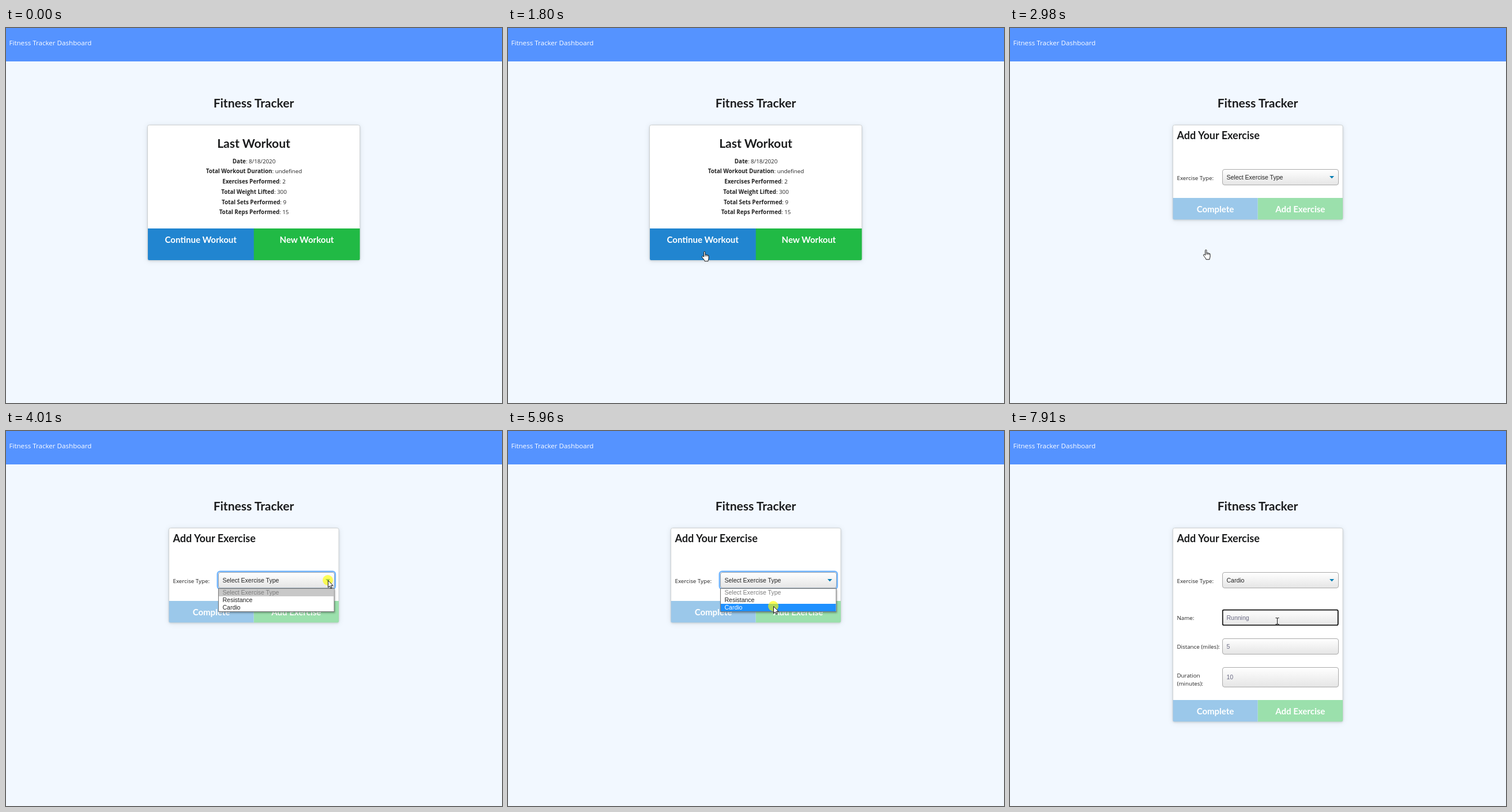
An HTML page that plays this animation: 860 by 651 pixels, repeating every 8000 ms.

```html
<!DOCTYPE html>
<html lang="en">
<head>
<meta charset="utf-8">
<title>Fitness Tracker</title>
<style>
html, body { margin: 0; width: 100%; height: 100%; overflow: hidden; background: #f2f8ff; }
svg { display: block; width: 860px; height: 651px; }
text { white-space: pre; }
.ui { font: 9.75px "Open Sans", "Noto Sans", sans-serif; fill: #222; }
.ui tspan { font-weight: 700; }
.head { font: 700 21px Lato, sans-serif; fill: #1b1c1d; }
.btn { font: 700 15px Lato, sans-serif; fill: #fff; }
.field { font: 10.5px "Liberation Sans", Arial, sans-serif; fill: #222; }
.hint { fill: #6b6b85; }
.mid { text-anchor: middle; }
.card { fill: #fff; stroke: #d0d3d4; filter: drop-shadow(0 1px 1.5px rgba(34,36,38,.13)) drop-shadow(0 1px 4px rgba(34,36,38,.1)); }
.box { fill: url(#shade); stroke: #aaa; }
</style>
</head>
<body>
<svg viewBox="0 0 860 651">
  <defs>
    <linearGradient id="shade" x2="0" y2="1">
      <stop stop-color="#fff"/><stop offset="1" stop-color="#e5e5e5"/>
    </linearGradient>
  </defs>
  <rect width="860" height="58" fill="#5593ff"/>
  <text class="ui" x="5.5" y="30" style="font-size:11.6px;fill:#fff">Fitness Tracker Dashboard</text>
  <text class="head mid" x="429.5" y="138">Fitness Tracker</text>

  <g id="summary">
    <rect class="card" x="245.5" y="168.5" width="368" height="234.5" rx="3"/>
    <text class="head mid" x="429.5" y="208">Last Workout</text>
    <g id="stats" class="ui mid"></g>
    <path id="resume" d="M246 348H430V403H248Q246 403 246 401Z"/>
    <path d="M429.7 348H613.5V401Q613.5 403 611.5 403H429.7Z" fill="#21ba45"/>
    <text class="btn mid" x="337.7" y="373">Continue Workout</text>
    <text class="btn mid" x="521.5" y="373">New Workout</text>
  </g>

  <g id="form">
    <rect id="sheet" class="card" x="282.5" y="168.5" width="294.5" rx="3"/>
    <text class="head" x="289.5" y="193" style="font-size:18px">Add Your Exercise</text>
    <text class="ui" x="289.5" y="263.5">Exercise Type:</text>
    <rect class="box" x="368.5" y="245.5" width="201" height="27" rx="3.5"/>
    <path d="M554 257H562L558 261.3Z" fill="#007cb2"/>
    <text id="choice" class="field" x="375.5" y="263"></text>
    <rect id="ring" x="366.7" y="243.7" width="204.2" height="30.4" rx="4.5" fill="none" stroke="#3b99fc" stroke-opacity=".7" stroke-width="2.5"/>
    <g id="cardio">
      <text class="ui" x="289.5" y="328">Name:</text>
      <text class="ui" x="289.5" y="378">Distance (miles):</text>
      <text class="ui" x="289.5" y="428">Duration</text>
      <text class="ui" x="289.5" y="442">(minutes):</text>
      <rect class="box" x="368.5" y="310.5" width="201" height="27" rx="3.5"/>
      <rect class="box" x="368.5" y="360.5" width="201" height="27" rx="3.5"/>
      <rect class="box" x="368.5" y="410.5" width="201" height="34" rx="3.5"/>
      <text class="field hint" x="375.5" y="327.5">Running</text>
      <text class="field hint" x="375.5" y="377.5">5</text>
      <text class="field hint" x="375.5" y="431">10</text>
      <rect id="focus" x="368.7" y="310.7" width="200" height="26.3" rx="2" fill="none" stroke="#111" stroke-width="1.7"/>
      <rect id="caret" x="376" y="318" width="1" height="12"/>
    </g>
    <g id="actions">
      <path d="M282.5 295H429.7V332.5H284.5Q282.5 332.5 282.5 330.5Z" fill="#9bc8ea"/>
      <path d="M429.7 295H577V330.5Q577 332.5 575 332.5H429.7Z" fill="#9be0ac"/>
      <text class="btn mid" x="356" y="320">Complete</text>
      <text class="btn mid" x="503.3" y="320">Add Exercise</text>
    </g>
    <g id="list">
      <rect x="368.5" y="273.5" width="200.5" height="40" fill="#fff" stroke="#777" style="filter:drop-shadow(1px 2px 1.5px rgba(0,0,0,.3))"/>
      <rect id="mark" x="369" width="199.5" height="13"/>
      <g id="options" class="field"></g>
    </g>
  </g>

  <g id="status">
    <path d="M0 636H220Q223 636 223 639V651H0Z" fill="#dee1e6"/>
    <text class="ui" x="1.8" y="647" style="font-size:8.42px;fill:#4a4d51">localhost:3000/exercise?id=5f3c9e93cc7cd034a8fa5d06</text>
  </g>

  <circle id="click" r="9" fill="#ff0" opacity=".65"/>
  <g id="pointer" fill="#fff" stroke="#000" stroke-width=".9" stroke-linejoin="round">
    <path id="arrow" d="M.5 .5V12.6L3.3 10 5 14.1 7 13.3 5.3 9.3H9Z"/>
    <path id="hand" transform="translate(-4.5 -.5)" d="M4 10V1.8a1.2 1.2 0 0 1 2.4 0V6.3a1.2 1.2 0 0 1 2.2 .4a1.2 1.2 0 0 1 2.2 .5a1 1 0 0 1 1.7 .8V12.5c0 1.5-1 2-1 4.8H5.5C5 14.5 2 12.5 1 10.3C.4 8.8 2 8 3 9ZM6.4 6.3V9M8.6 6.7V9M10.8 7.2V9"/>
    <path id="beam" fill="none" d="M-2.5 -5.5H-1L.5 -5 2 -5.5H3.5M.5 -5V5M-2.5 5.5H-1L.5 5 2 5.5H3.5"/>
  </g>
</svg>
<script>
const $ = id => document.getElementById(id);
const show = (id, on) => $(id).style.display = on ? '' : 'none';
const set = (id, attrs) => { for (const k in attrs) $(id).setAttribute(k, attrs[k]); };
const LOOP = 8000;

$('stats').innerHTML = [
  ['Date', '8/18/2020'], ['Total Workout Duration', 'undefined'], ['Exercises Performed', 2],
  ['Total Weight Lifted', 300], ['Total Sets Performed', 9], ['Total Reps Performed', 15]
].map(([name, value], i) =>
  `<text x="430" y="${234.7 + 17.7 * i}"><tspan>${name}</tspan>: ${value}</text>`).join('');

const names = ['Select Exercise Type', 'Resistance', 'Cardio'];
$('options').innerHTML = names.map((name, i) =>
  `<text x="375.5" y="${283.5 + 13.3 * i}">${name}</text>`).join('');
const options = $('options').children;

// Pointer moves: start, end, steps, x, y
const moves = [
  [300, 300, 1, 793, 557], [380, 380, 1, 775, 492], [460, 460, 1, 763, 523],
  [1080, 1880, 11, 338.5, 385], [3060, 3620, 8, 547, 257], [3700, 3700, 1, 549, 257],
  [3850, 3850, 1, 558, 259], [4390, 5030, 9, 460, 304], [6740, 7050, 5, 463, 330]
];
const smooth = p => p * p * (3 - 2 * p);

function pointerAt(t) {
  let x = 793, y = 557;
  for (const [start, end, steps, toX, toY] of moves) {
    if (t < start) break;
    const gap = (end - start) / (steps - 1) || 80;
    const p = Math.min(1, (Math.floor((t - start) / gap + .01) + 1) / steps);
    const px = start === 1080 ? 1 - (1 - p) ** 2.3 : smooth(p);
    x += (toX - x) * px;
    y += (toY - y) * smooth(p);
  }
  return [x, y];
}

function draw(t) {
  const within = (a, b) => t >= a && t < b;
  const [x, y] = pointerAt(t);
  const form = t >= 2590, full = t >= 6040;

  show('summary', !form);
  show('form', form);
  set('resume', { fill: t < 2430 ? '#2185d0' : t < 2510 ? '#1e77ba' : '#1a69a4' });

  show('cardio', full);
  set('sheet', { height: full ? 336 : 164 });
  set('actions', { transform: `translate(0 ${full ? 172 : 0})` });
  $('choice').textContent = names[full ? 2 : 0];
  show('ring', within(3850, 7360));
  show('focus', t >= 7360);
  show('caret', within(7360, 7910));

  show('list', within(3930, 6040));
  const row = Math.max(0, Math.min(2, Math.floor((y - 274) / 13)));
  set('mark', { y: 274 + 13 * row, fill: row ? '#1e90ff' : '#c8c8c8' });
  for (let i = 0; i < 3; i++)
    options[i].style.fill = i === 0 ? '#7d7d7d' : i === row ? '#fff' : '#222';

  show('status', within(1960, 2900));
  $('status').style.opacity = within(2040, 2820) ? 1 : .5;

  show('click', within(3850, 4090) || within(5960, 6040) || within(7360, 7440));
  set('click', { cx: x, cy: y });

  const hand = within(1080, 3060) && x < 430 && y < 403;
  const beam = full && y >= 310;
  show('pointer', t >= 300 && !within(7440, 7590));
  set('pointer', { transform: `translate(${Math.round(x)} ${Math.round(y)})` });
  show('hand', hand);
  show('beam', beam);
  show('arrow', !hand && !beam);
}

const begin = performance.now();
function tick() {
  draw((performance.now() - begin) % LOOP);
  requestAnimationFrame(tick);
}
draw(0);
tick();
</script>
</body>
</html>
```
